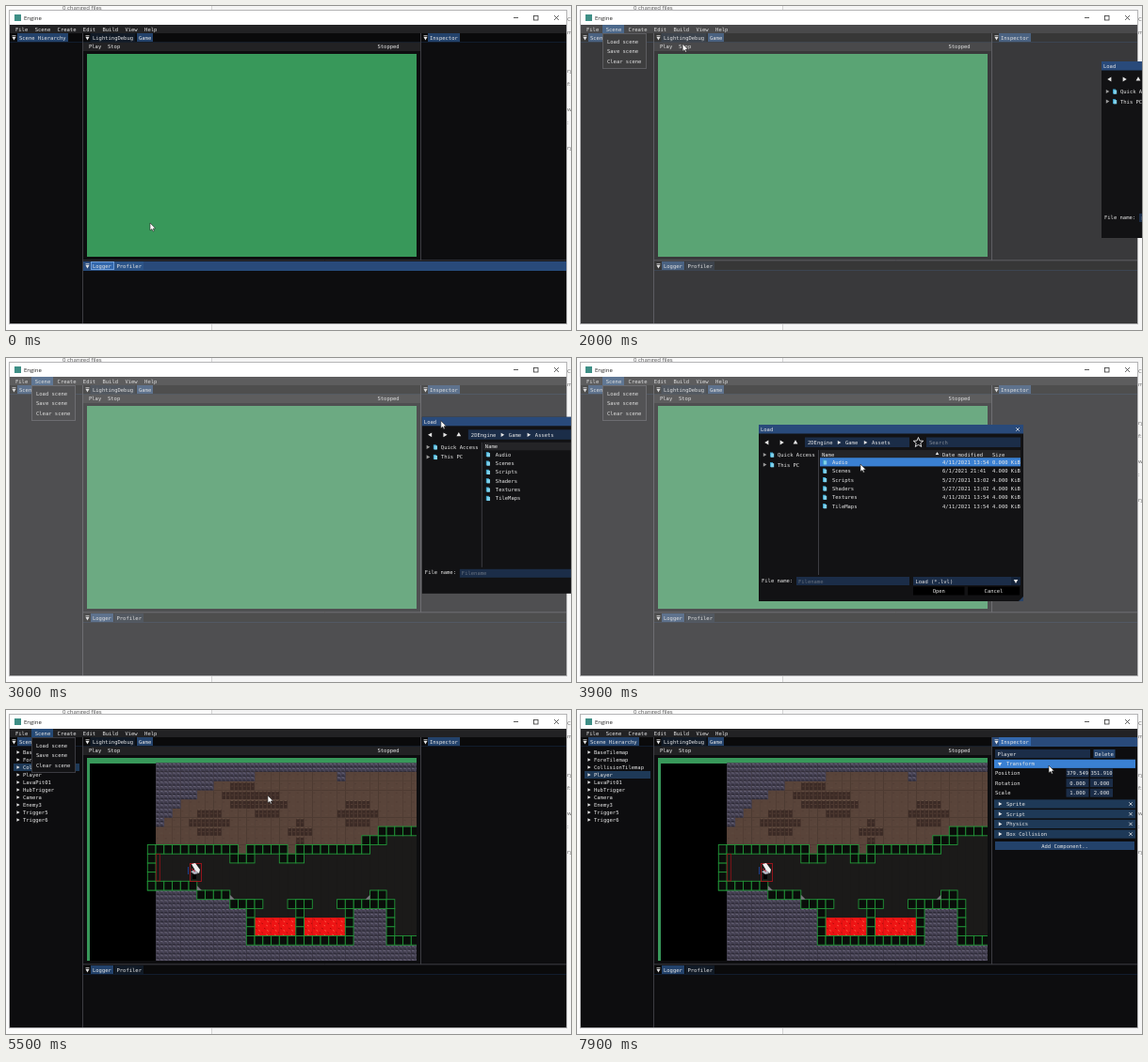
Recreate the animation shown at these times as an HTML page with a canvas. Size 600x345 px, loop 8 s.

```html
<!DOCTYPE html>
<html lang="en">
<head>
<meta charset="utf-8">
<title>Engine</title>
<style>
html, body { margin: 0; width: 100%; height: 100%; overflow: hidden; background: #f6f6f6; }
canvas { display: block; width: 100vw; height: 100vh; }
</style>
</head>
<body>
<canvas id="stage" width="600" height="345"></canvas>
<script>
const MONO = '5.5px "DejaVu Sans Mono", monospace';
const SANS = '6px "Open Sans", sans-serif';
const TITLE = '#294a7a', TAB = '#23426b', TAB_ON = '#3368ad', TAB_OFF = '#111a26';
const HOVER = '#3a80d2', HEADER = '#1e3957', FIELD = '#1b2d48';
const PANEL = '#0d0d0f', LINE = '#3c3c42', BAR = '#222224', INK = '#e6e6e6';
const screen = document.getElementById('stage').getContext('2d');
let g = screen;

// ---- helpers ----
function box(x0, y0, x1, y1, color) {
  g.fillStyle = color;
  g.fillRect(x0, y0, x1 - x0, y1 - y0);
}
function frame(x0, y0, x1, y1, color, width = 1) {
  g.strokeStyle = color;
  g.lineWidth = width;
  g.strokeRect(x0 + .5, y0 + .5, x1 - x0 - 1, y1 - y0 - 1);
}
function text(s, x, y, color = INK, font = MONO, align = 'left') {
  g.font = font;
  g.textAlign = align;
  g.fillStyle = color;
  g.fillText(s, x, y + 2);
}
function poly(points, fill, stroke, width = 1) {
  g.beginPath();
  points.forEach(([x, y]) => g.lineTo(x, y));
  g.closePath();
  if (fill) { g.fillStyle = fill; g.fill(); }
  if (stroke) { g.strokeStyle = stroke; g.lineWidth = width; g.stroke(); }
}
function line(x0, y0, x1, y1, color, width = 1) {
  g.strokeStyle = color;
  g.lineWidth = width;
  g.beginPath();
  g.moveTo(x0, y0);
  g.lineTo(x1, y1);
  g.stroke();
}
// Points on a ring whose radius depends on the index
const ring = (n, x, y, turn, radius) => Array.from({ length: n }, (_, i) => {
  const a = turn + i * Math.PI * 2 / n;
  return [x + radius(i) * Math.cos(a), y + radius(i) * Math.sin(a)];
});
function arrow(x, y, dir, r = 2, color = INK) {
  const turn = ['right', 'down', 'left', 'up'].indexOf(dir) * Math.PI / 2;
  poly(ring(3, x, y, turn, () => r * 1.2), color);
}
function cross(x, y, r, color = INK) {
  line(x - r, y - r, x + r, y + r, color, .8);
  line(x - r, y + r, x + r, y - r, color, .8);
}
function button(s, x0, x1, y, color, align = 'center') {
  box(x0, y - 4.5, x1, y + 4.5, color);
  text(s, align === 'center' ? (x0 + x1) / 2 : x0 + 2.5, y, INK, MONO, align);
}

// ---- game view ----
const COL = 8.75, ROW = 9.7, LAST = 32;
const colX = c => 150.3 + COL * c, rowY = r => 143.5 + ROW * r;

function cells(c0, r0, c1, r1, draw) {
  for (let r = r0; r <= r1; r++)
    for (let c = c0; c <= c1; c++) draw(colX(c), rowY(r));
}
// Visits cells along steps such as "r5 d2": right, left, up, down, x = down and right
function walk(c, r, steps, visit) {
  visit(c, r);
  for (const step of steps.split(' '))
    for (let n = +step.slice(1); n > 0; n--) {
      const d = step[0];
      c += 'rx'.includes(d) - (d === 'l');
      r += 'dx'.includes(d) - (d === 'u');
      visit(c, r);
    }
}
// Lowest cell in each column of a walk
function profile(c, r, steps) {
  const low = [];
  walk(c, r, steps, (x, y) => low[x] = Math.max(low[x] ?? y, y));
  return low;
}
function rock(x, y) {
  box(x, y, x + COL + .3, y + ROW + .3, '#423e4e');
  for (let i = 0; i < 4; i++) {
    const px = x + (i % 2) * 4.4 + .6, py = y + (i >> 1) * 4.9 + 1;
    line(px, py, px + 2.6, py + .4, '#706b80', .9);
    line(px + 3, py + .4, px + 3.2, py + 2.8, '#57526a', .7);
    line(px, py + 3.2, px + 3, py + 3.4, '#282531', .9);
  }
}
function soil(x, y) {
  box(x, y, x + COL + .3, y + ROW + .3, '#59443a');
  line(x + 1, y + 3, x + 3, y + 3, '#503c33', .7);
  line(x + 5, y + 7, x + 7.5, y + 7, '#624c41', .7);
}
function rubble(x, y) {
  for (let i = 0; i < 2; i++) {
    const px = x + .4 + i * 4.4;
    box(px, y + 1.5, px + 3.6, y + ROW, '#3b2a25');
    line(px + .5, y + 1.5, px + 3, y + 1.5, '#70594b', .7);
    line(px + 1, y + 5.5, px + 3, y + 5.5, '#5c463b', .7);
  }
}
function lava(x, y) {
  box(x, y, x + COL + .3, y + ROW + .3, '#ee1414');
  for (let i = 0; i < 4; i++) {
    const px = x + 1.2 + (i * 3.1) % 7, py = y + 1.5 + i * 2.2;
    line(px, py, px + 1.6, py + .8, i % 2 ? '#ff6a50' : '#a80808', .9);
  }
}
function solid(c, r) {
  const x = colX(c), y = rowY(r);
  box(x, y, x + COL, y + ROW, '#0a0d0a');
  g.strokeStyle = '#219638';
  g.lineWidth = .9;
  g.strokeRect(x, y, COL, ROW);
}
function slope(c, r, side) {
  const x = colX(c), y = rowY(r);
  poly([[x, y], [x, y - 5], [x + 5 * side, y]], '#77747c');
}
function drawPlayer(x, y) {
  frame(x - 6, y - 7, x + 7, y + 13, '#a0141c', .9);
  box(x - 8, y - 3, x - 7, y + 5, '#263f8c');
  poly([[x - 4, y - 6], [x, y - 7], [x + 5, y], [x + 4, y + 4], [x, y + 1]], '#f0f0f0');
  poly([[x - 5, y + 2], [x, y], [x + 3, y + 4], [x - 1, y + 5]], '#b4b4c0');
  box(x - 3, y + 5, x + 1, y + 10, '#000');
  line(x - 4, y - 1, x, y + 2, '#c02030');
}
function drawGame() {
  const roof = 'u4 r10 d1 r2 u1 r4 d1 r2 u1 r8 u1 r2 u1 r4';
  const ground = 'r5 x1 r3 x1 r2 d4 r12 u4 r5 d4 r3';
  const top = profile(0, 0, roof.slice(3)), bottom = profile(0, 4, ground);
  g.beginPath();
  g.rect(86, 51, 350, 216);
  g.clip();
  box(86, 51, 436, 267, '#38985a');
  box(89, 57, 436, 267, '#000');
  cells(1, -9, LAST, -9, rock);
  for (let c = 1; c <= LAST; c++) {
    cells(c, -8, c, top[c], soil);
    box(colX(c), rowY(top[c] + 1), colX(c + 1) + 1, rowY(bottom[c] + 1), '#1b1a19');
    cells(c, bottom[c] + 1, c, 12, rock);
  }
  for (let i = 0; i < 6; i++) cells(1, i - 8, Math.floor(12 * .66 ** i), i - 8, rock);
  cells(23, -8, 23, -8, rock);
  // mounds: centre column, centre row, half width
  for (const [c, r, w] of [[11, -6, 2], [14, -5, 2], [7, -3, 2], [18, -2, 1], [25, -4, 2]])
    for (let k = -1; k <= 1; k++) cells(c - w + Math.abs(k), r + k, c + w - Math.abs(k), r + k, rubble);
  cells(13, 8, 23, 9, lava);
  walk(0, 4, roof, solid);
  walk(0, 4, ground, solid);
  walk(12, 6, 'r1', solid);
  walk(23, 6, 'r1', solid);
  walk(17, 6, 'r2 l1 d3', solid);
  walk(27, 5, 'r1', solid);
  slope(6, 5, 1);
  slope(10, 6, 1);
  slope(27, 6, -1);
  frame(159, 153, 164, 182.5, '#8e1219', .8);
  drawPlayer(201, 170);
}
const gameLayer = document.createElement('canvas');
gameLayer.width = 600;
gameLayer.height = 345;
g = gameLayer.getContext('2d');
drawGame();
g = screen;

// ---- desktop and editor ----
function drawDesktop() {
  box(0, 0, 600, 345, '#f5f5f5');
  box(0, 0, 218, 345, '#fbfbfb');
  line(218.5, 0, 218.5, 345, '#d4d4d4');
  text('0 changed files', 60, 2, '#555', SANS);
  'C,me,,,ry,f:,,w,:,,ry'.split(',').forEach((s, i) => text(s, 596, 14 + i * 13.7, '#666', SANS));
  box(3, 4, 596, 339, '#b4b4b6');
  box(4, 5, 595, 20, '#fff');
  box(9, 9, 16, 16, '#3f8f86');
  text('Engine', 19, 12.5, '#222', SANS);
  line(539, 12.5, 544, 12.5, '#333', .8);
  frame(560, 10, 565.5, 15.5, '#333', .8);
  cross(584.5, 12.5, 2.4, '#333');
  box(4, 20, 595, 338, PANEL);
}
function tabBar(x0, x1, y, focused, tab0, tab1) {
  box(x0, y, x1, y + 9, focused ? TITLE : '#0a0a0b');
  box(tab0, y, tab1, y + 9, focused ? TAB_ON : TAB);
  box(x0, y + 9, x1, y + 9.7, focused ? TAB_ON : '#14233a');
  line(x0 + 2.5, y + 2.8, x0 + 6.5, y + 2.8, INK, .9);
  arrow(x0 + 4.5, y + 5.2, 'down', 1.9);
}
function drawMenuBar(menu, cy) {
  box(4, 20, 595, 29, BAR);
  if (menu) box(27, 20, 50, 29, cy < 30 ? HOVER : '#264a76');
  let x = 10;
  for (const s of ['File', 'Scene', 'Create', 'Edit', 'Build', 'View', 'Help']) {
    text(s, x, 24.8);
    x += s.length * 3.31 + 7.4;
  }
}
function drawTabs(t, picked, opened) {
  tabBar(4, 81, 29, picked && !opened, 12, 66);
  tabBar(82, 440, 29, false, 139, 156);
  tabBar(441, 595, 29, opened, 448, 482);
  tabBar(82, 595, 272, t < 500, 90, 114);
  if (t < 500) frame(90, 272, 115, 281, '#6f9fdc');
  text('Scene Hierarchy', 14, 33.8);
  button('LightingDebug', 89.5, 137.5, 33.5, TAB_OFF, 'left');
  text('Game', 141, 33.8);
  text('Inspector', 450, 33.8);
  text('Logger', 92, 276.5);
  button('Profiler', 115, 146, 276.5, t < 500 ? '#2c5488' : TAB_OFF, 'left');
}
function drawEditor(t, cx, cy) {
  const loaded = t >= 5000, picked = t >= 6900, opened = t >= 7800;
  const menu = t >= 1000 && t < 5900;
  drawMenuBar(menu, cy);
  drawTabs(t, picked, opened);

  box(82, 38.7, 440, 48, BAR);
  text('Play', 88, 43);
  text('Stop', 108, 43);
  text('Stopped', 394.5, 43);
  if (loaded) g.drawImage(gameLayer, 0, 0);
  else box(86, 51, 436, 267, '#38985a');
  line(81.5, 29, 81.5, 338, LINE);
  line(440.5, 29, 440.5, 271, LINE);
  line(82, 270.8, 595, 270.8, LINE);

  if (loaded) drawHierarchy(picked, cx, cy, menu);
  if (picked) drawInspector(opened);
  if (menu) {
    box(27, 29, 74, 67, '#131315');
    frame(27, 29, 74, 67, '#3a3a40');
    if (t < 1900 && cy > 33) box(29, 33, 72, 43, HOVER);
    ['Load scene', 'Save scene', 'Clear scene'].forEach((s, i) => text(s, 32, 37.8 + i * 10.6));
  }
}
const ITEMS = ['BaseTilemap', 'ForeTilemap', 'CollisionTilemap', 'Player', 'LavaPit01',
  'HubTrigger', 'Camera', 'Enemy3', 'Trigger5', 'Trigger6'];

function drawHierarchy(picked, cx, cy, menu) {
  const selected = picked ? 'Player' : menu ? 'CollisionTilemap' : '';
  ITEMS.forEach((name, i) => {
    const y = 45 + i * 8;
    const over = !menu && cx < 78 && Math.abs(cy - y) < 4;
    if (over || name === selected) box(8, y - 4, 78, y + 4, over ? HOVER : HEADER);
    arrow(12.5, y, 'right', 1.8);
    text(name, 18, y);
  });
}
function drawInspector(opened) {
  button('Player', 444, 545, 46.5, FIELD, 'left');
  button('Delete', 548.5, 571.5, 46.5, TAB);
  ['Transform', 'Sprite', 'Script', 'Physics', 'Box Collision'].forEach((name, i) => {
    const active = opened && i === 0;
    const y = 57.3 + i * 10.7 + (opened && i ? 32 : 0);
    box(443, y - 4.6, 593, y + 4.6, active ? HOVER : HEADER);
    arrow(449, y, active ? 'down' : 'right');
    text(name, 456, y);
    if (i) cross(588, y, 1.7);
  });
  if (opened) ['Position 379.549 351.910', 'Rotation 0.000 0.000', 'Scale 1.000 2.000'].forEach((row, i) => {
    const y = 67 + i * 10.6, [name, a, b] = row.split(' ');
    text(name, 444, y);
    button(a, 519.5, 543.5, y, FIELD);
    button(b, 545, 569, y, FIELD);
  });
  button('Add Component..', 444, 592, opened ? 144.5 : 113, TAB);
}

// ---- file dialog ----
const FILES = ['Audio', 'Scenes', 'Scripts', 'Shaders', 'Textures', 'TileMaps'];
const DATES = { Scenes: '6/1/2021 21:41', Scripts: '5/27/2021 13:02', Shaders: '5/27/2021 13:02' };

function folder(x, y) {
  box(x - 2, y - 2.5, x + 1, y + 2.5, '#3aa0c8');
  box(x - 1, y - 1.5, x + 2.2, y + 2.7, '#7fd0ea');
}
function drawFiles(hover) {
  box(65, 27, 278, 35.5, '#242427');
  text('Name', 67, 31.5);
  arrow(189.5, 31, 'up', 1.7);
  text('Date modified', 195, 31.5);
  text('Size', 248, 31.5);
  g.save();
  g.beginPath();
  g.rect(64, 26, 214, 134);
  g.clip();
  FILES.forEach((name, i) => {
    const y = 39.8 + i * 9.35;
    if (i === hover) box(65, y - 4.6, 278, y + 4.6, HOVER);
    folder(70, y);
    text(name, 78, y);
    text(DATES[name] || '4/11/2021 13:54', 195, y);
    text(i ? '4.000 KiB' : '0.000 KiB', 248, y);
  });
  g.restore();
}
function drawDialog(dx, dy, hover) {
  g.save();
  g.translate(dx, dy);
  box(0, 0, 281, 188, '#121214');
  box(0, 0, 281, 9.5, TITLE);
  text('Load', 2, 5);
  cross(275, 5, 1.8);
  ['left', 'right', 'up'].forEach((dir, i) => arrow(9 + i * 15, 19, dir, 2.3));
  box(49, 13.5, 160, 24, FIELD);
  text('2DEngine', 52, 19);
  arrow(85, 19, 'right');
  text('Game', 92, 19);
  arrow(113, 19, 'right');
  text('Assets', 120, 19);
  poly(ring(10, 169.5, 19, -Math.PI / 2, i => i % 2 ? 2.4 : 5.5), null, '#eee', .9);
  box(178, 13.5, 278, 24, FIELD);
  text('Search', 181, 19, '#7d8590');

  ['Quick Access', 'This PC'].forEach((s, i) => {
    const y = 32 + i * 10.6;
    arrow(6, y, 'right', 2, '#999');
    folder(14, y);
    text(s, 20, y);
  });
  line(63.5, 27, 63.5, 160, LINE);
  drawFiles(hover);

  text('File name:', 3, 165.5);
  box(40, 162, 160, 171, FIELD);
  text('Filename', 42, 166.5, '#66707e');
  button('Load (*.lvl)', 164, 278, 166.5, FIELD, 'left');
  box(268, 162, 278, 171, '#14233a');
  arrow(273, 166.3, 'down', 2.2);
  button('Open', 164, 218.5, 177, '#000');
  button('Cancel', 222, 277, 177, '#000');
  poly([[281, 183], [281, 188], [276, 188]], '#2a4468');
  g.restore();
}

// ---- timeline ----
// Pointer stops: arrival time, x, y. A move takes at most MOVE ms before arrival.
const MOVE = 900, GRAB = 2700, DROP = 3500;
const STOPS = [[0, 153, 231], [900, 41, 28], [1500, 45, 37], [GRAB, 577, 63], [DROP, 213, 75],
  [3900, 301, 113], [4300, 285, 118], [5400, 278, 91], [6600, 46, 68], [7700, 501, 59]];
const ARROW = [[0, 0], [0, 8], [1.9, 6.4], [3.1, 9], [4.3, 8.5], [3.2, 6], [5.6, 5.8]];
const clamp = (v, lo, hi) => Math.max(lo, Math.min(hi, v));

function pointer(t) {
  const i = STOPS.findIndex(s => s[0] > t);
  if (i < 0) return STOPS[STOPS.length - 1].slice(1);
  const [t0, x0, y0] = STOPS[i - 1], [t1, x1, y1] = STOPS[i];
  const p = clamp(1 - (t1 - t) / Math.min(MOVE, t1 - t0), 0, 1);
  const e = p * p * (3 - 2 * p);
  return [x0 + (x1 - x0) * e, y0 + (y1 - y0) * e];
}
function draw(t) {
  const [cx, cy] = pointer(t);
  drawDesktop();
  drawEditor(t, cx, cy);
  if (t >= 1900 && t < 5000) {
    box(4, 20, 595, 338, `rgba(204,204,204,${.35 * clamp((t - 1800) / 300, 0, 1)})`);
    const [gx, gy] = pointer(clamp(t, GRAB, DROP));
    const dx = gx - 20, dy = gy - 4;
    drawDialog(dx, dy, t > DROP ? Math.floor((cy - dy - 35.2) / 9.35) : -1);
  }
  poly(ARROW.map(([x, y]) => [cx + x, cy + y]), '#fff', '#222', .6);
}
function tick(now) {
  draw(Math.floor(now % 8000 / 100) * 100);
  requestAnimationFrame(tick);
}
requestAnimationFrame(tick);
</script>
</body>
</html>
```
